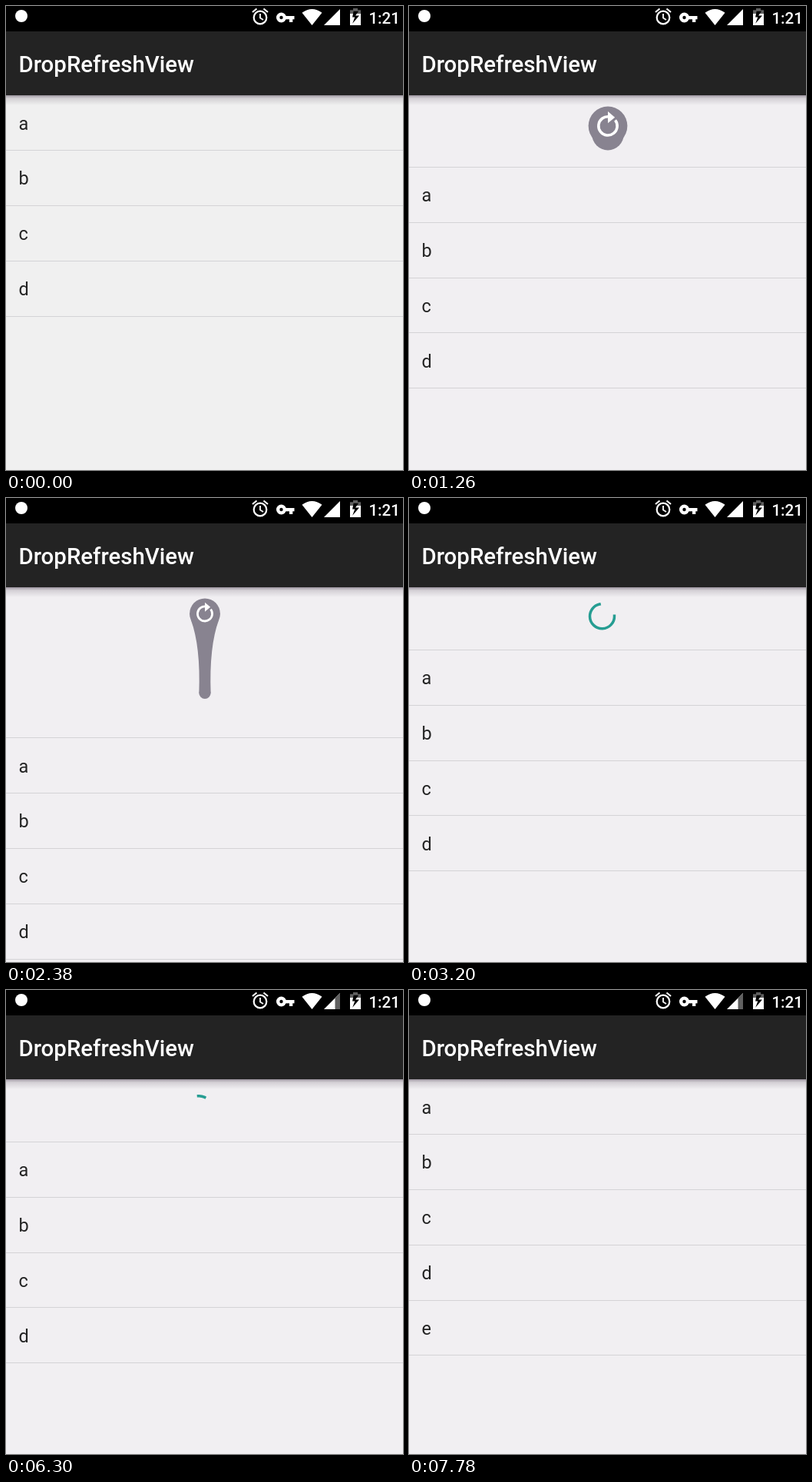
These frames come from a looping animation (517 by 603 pixels, 8 s). An HTML page with a canvas:

```html
<!DOCTYPE html>
<html lang="en">
<head>
<meta charset="utf-8">
<title>Pull to refresh</title>
<style>
html, body { margin: 0; width: 100%; height: 100%; overflow: hidden; background: #f0f0f0; }
canvas { display: block; }
</style>
</head>
<body>
<canvas id="stage" width="517" height="603"></canvas>
<script>
const c = document.getElementById('stage').getContext('2d');
const W = 517, H = 603, LOOP = 8000;
const BAR = 116, TOP = 115.3, ROW = 71.8, HOLD = 81.6;
const RELEASE = 2740, DONE = 7395, SETTLE = 385;
const TAU = Math.PI * 2, RAD = Math.PI / 180;

// Finger drag: time, list offset
const drag = [[500, 0], [860, 57], [1260, 93.5], [1670, 148], [2090, 182.5], [2380, 196], [RELEASE, 214]];

function dragAt(t) {
  if (t <= drag[0][0]) return 0;
  const last = drag.length - 1;
  const slope = i => {
    const a = drag[Math.max(0, i - 1)], b = drag[Math.min(last, i + 1)];
    return (b[1] - a[1]) / (b[0] - a[0]);
  };
  let i = 0;
  while (i < last - 1 && t > drag[i + 1][0]) i++;
  const [t0, y0] = drag[i], [t1, y1] = drag[i + 1];
  const d = t1 - t0, u = (t - t0) / d, v = 1 - u;
  return y0 * (1 + 2 * u) * v * v + y1 * u * u * (3 - 2 * u)
    + d * (slope(i) * u * v * v - slope(i + 1) * u * u * v);
}

function settle(from, to, u) {
  const rest = 1 - Math.min(1, u);
  return to + (from - to) * rest * rest;
}

function offsetAt(t) {
  if (t < RELEASE) return dragAt(t);
  if (t < DONE) return settle(drag[drag.length - 1][1], HOLD, (t - RELEASE) / SETTLE);
  return settle(HOLD, 0, (t - DONE) / SETTLE);
}

// cubic-bezier(.4, 0, .2, 1)
function ease(x) {
  if (x <= 0) return 0;
  if (x >= 1) return 1;
  let lo = 0, hi = 1, s = 0.5;
  for (let i = 0; i < 24; i++) {
    s = (lo + hi) / 2;
    const v = 1 - s;
    if (1.2 * s * v * v + 0.6 * s * s * v + s * s * s < x) lo = s; else hi = s;
  }
  return s * s * (3 - 2 * s);
}

function rect(color, x, y, w, h) {
  c.fillStyle = color;
  c.fillRect(x, y, w, h);
}

function disc(color, x, y, r) {
  c.fillStyle = color;
  c.beginPath();
  c.arc(x, y, r, 0, TAU);
  c.fill();
}

function poly(color, ...pts) {
  c.fillStyle = color;
  c.beginPath();
  for (let i = 0; i < pts.length; i += 2) c.lineTo(pts[i], pts[i + 1]);
  c.closePath();
  c.fill();
}

function line(width, ...pts) {
  c.lineWidth = width;
  c.beginPath();
  for (let i = 0; i < pts.length; i += 2) c.lineTo(pts[i], pts[i + 1]);
  c.stroke();
}

function text(str, x, y, size, weight, color) {
  c.font = `${weight} ${size}px Roboto, sans-serif`;
  c.fillStyle = color;
  c.fillText(str, x, y);
}

function drawDrop(off) {
  const pull = Math.max(0, off - HOLD), gap = 0.9 * pull;
  const R = 26 - 0.053 * pull, r = 26 / (1 + gap * 0.0234);
  const x = 259, y = 130.5 + R, tail = y + gap;
  const color = '#888390';
  disc(color, x, y, R);
  if (gap > 0) {
    disc(color, x, tail, r);
    const sx = R * Math.cos(25 * RAD), sy = y + R * Math.sin(25 * RAD);
    const my = sy + (tail - sy) * 0.36, mx = r * 0.72;
    c.beginPath();
    c.moveTo(x - sx, sy);
    c.quadraticCurveTo(x - mx, my, x - r, tail);
    c.lineTo(x + r, tail);
    c.quadraticCurveTo(x + mx, my, x + sx, sy);
    c.fill();
  }
  c.strokeStyle = '#fff';
  c.lineWidth = 0.14 * R;
  c.lineCap = 'butt';
  c.beginPath();
  c.arc(x, y, 0.48 * R, -38 * RAD, 270 * RAD);
  c.stroke();
  poly('#fff', x, y - 0.74 * R, x + 0.36 * R, y - 0.44 * R, x, y - 0.14 * R);
}

function drawSpinner(t) {
  const ms = (t - 2720) * 1.045, p = ms / 1333 % 1;
  const base = -90 + ms * 720 / 6665 + 90 * p;
  const from = base + 270 * ease(2 * p - 1), to = base + 270 * ease(2 * p);
  c.strokeStyle = '#269d92';
  c.lineWidth = 3.5;
  c.lineCap = 'square';
  c.beginPath();
  c.arc(251.5, 153.7, 16, from * RAD, Math.max(to, from + 0.5) * RAD);
  c.stroke();
  c.lineCap = 'butt';
}

function drawList(off, bg, rows) {
  const top = TOP + off;
  rect(bg, 0, Math.round(top), W, H);
  for (let i = 0; i <= rows.length; i++) {
    const y = top + ROW * i;
    if (i || off > 0) rect('#d4d3d6', 0, Math.round(y), W, 1);
    if (i < rows.length) text(rows[i], 16.6, Math.round(y + 45.3), 23.5, 400, '#232323');
  }
}

function drawStatus(t) {
  const white = '#fff', dim = '#606060';
  rect('#000', 0, 0, W, 33);
  disc(white, 20, 13, 8);

  c.strokeStyle = white;
  c.lineWidth = 2.2;
  c.beginPath();
  c.arc(331, 15, 8.3, 0, TAU);
  c.stroke();
  line(2.2, 321, 8, 326.5, 3.5);
  line(2.2, 335.5, 3.5, 341, 8);
  line(1.8, 331, 10, 331, 15.5, 335, 18);

  disc(white, 358.5, 15, 6.5);
  rect(white, 362, 13, 13.5, 4.3);
  rect(white, 369, 15, 4.3, 6);
  disc('#000', 358.5, 15, 2.2);

  c.fillStyle = white;
  c.beginPath();
  c.moveTo(398.5, 25);
  c.lineTo(385.5, 8.8);
  c.quadraticCurveTo(398.5, -0.8, 411.5, 8.8);
  c.fill();

  poly(white, 435, 4, 435, 25, 414, 25);
  if (t >= 3300) poly(dim, 435, 4, 435, 25, 428.5, 25, 428.5, 10.5);

  rect(dim, 452, 3, 6, 3);
  rect(dim, 448, 5.3, 14, 5);
  rect(white, 448, 10, 14, 15);
  poly('#000', 452.6, 6.7, 459, 6.7, 455.1, 12.6, 460, 12.6, 451.2, 22.8, 454.3, 14.4, 451.1, 14.4);

  text('1:21', 472.4, 22.5, 20.6, 500, white);
}

function drawHeader() {
  const g = c.createLinearGradient(0, BAR, 0, BAR + 13);
  g.addColorStop(0, 'rgba(55,40,60,.45)');
  g.addColorStop(0.3, 'rgba(55,40,60,.16)');
  g.addColorStop(1, 'rgba(55,40,60,0)');
  rect(g, 0, BAR, W, 13);
  rect('#232323', 0, 33, W, BAR - 33);
  text('DropRefreshView', 16.6, 86, 29.4, 500, '#fff');
}

function draw(t) {
  const off = offsetAt(t);
  const bg = t < 500 ? '#f0f0f0' : '#f1eff2';
  rect(bg, 0, 0, W, H);
  if (off > 0) {
    if (t < RELEASE) drawDrop(off); else drawSpinner(t);
  }
  drawList(off, bg, t < DONE ? 'abcd' : 'abcde');
  drawHeader();
  drawStatus(t);
}

const start = performance.now();
function tick() {
  draw((performance.now() - start) % LOOP);
  requestAnimationFrame(tick);
}
tick();
</script>
</body>
</html>
```
